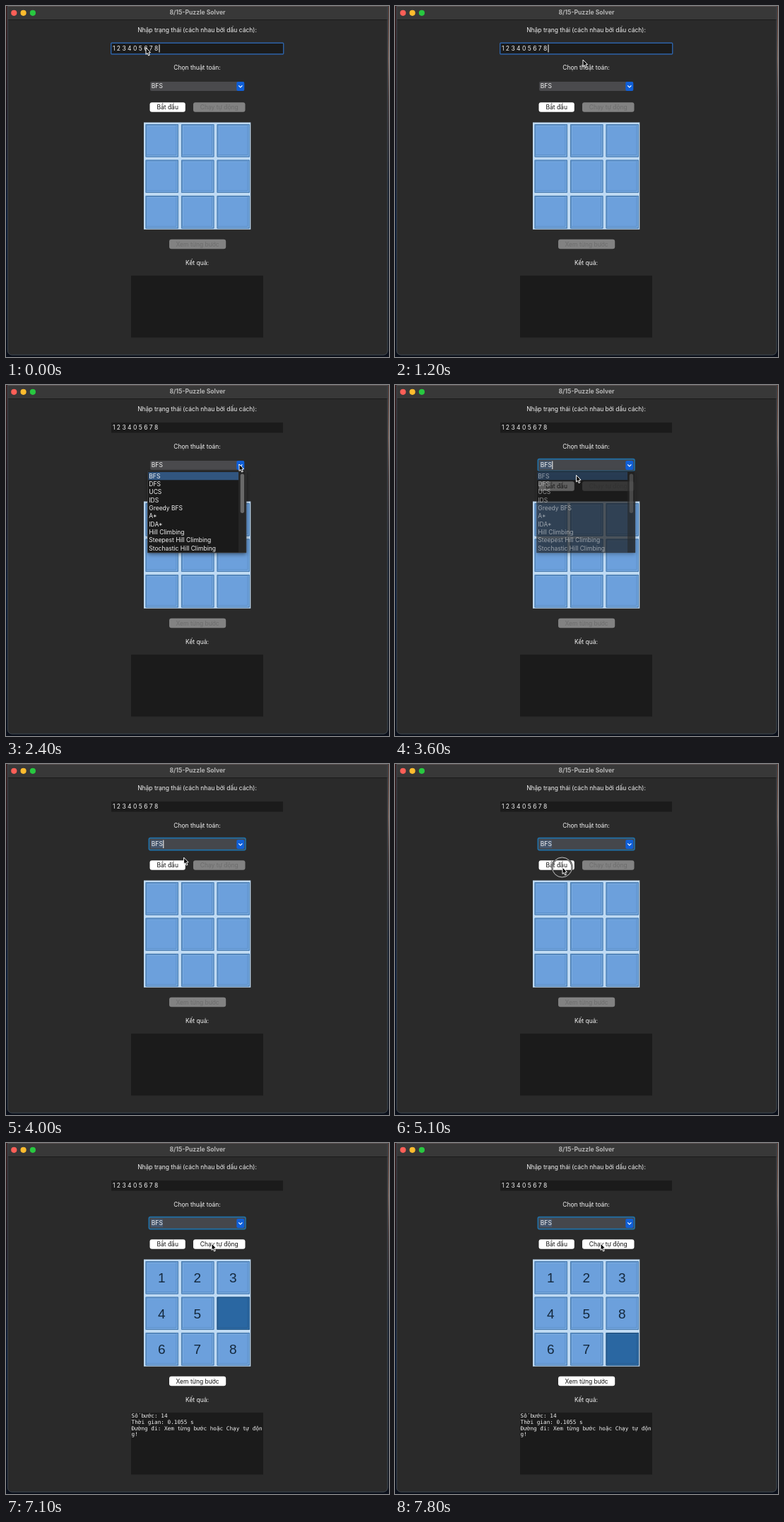
An HTML page with a canvas for the animation above (8000 ms loop, 542 px wide and 496 px high).

```html
<!DOCTYPE html>
<html lang="vi">
<head>
<meta charset="utf-8">
<title>8/15-Puzzle Solver</title>
<style>
  html, body { margin: 0; height: 100%; overflow: hidden; background: #0b1424; }
  canvas { display: block; width: 542px; height: 496px; }
</style>
</head>
<body>
<canvas id="stage" width="542" height="496"></canvas>
<script>
const ctx = document.getElementById('stage').getContext('2d');
const LOOP = 8000, STEP = 100;
const UI = '8.5px Inter, sans-serif';
const MONO = '7.7px "DejaVu Sans Mono", monospace';
const ALGORITHMS = ['BFS', 'DFS', 'UCS', 'IDS', 'Greedy BFS', 'A*', 'IDA*',
  'Hill Climbing', 'Steepest Hill Climbing', 'Stochastic Hill Climbing'];
const RESULT = ['Số bước: 14', 'Thời gian: 0.1055 s',
  'Đường đi: Xem từng bước hoặc Chạy tự độn', 'g!'];

// Moments of the interaction, in ms
const OPEN = 2400, PICK = 3500, CLOSED = 3800, CLICK = 5100, SOLVED = 5300;
const FIRST_MOVE = 7100, SECOND_MOVE = 7600;

// Pointer path: [time, x, y]
const PATH = [
  [0, 198, 59], [300, 156, 57], [400, 156, 57], [900, 220, 58], [1100, 220, 58],
  [1200, 266, 76], [1800, 330, 112], [2700, 330, 112], [3300, 256.5, 127.5],
  [3900, 256.5, 127.5], [4300, 237, 146], [6200, 237, 146], [6300, 260.5, 146],
  [6600, 291, 142], [LOOP, 291, 142]
];

function pointerAt(t) {
  const i = PATH.findIndex(p => p[0] > t);
  const [t0, x0, y0] = PATH[i - 1], [t1, x1, y1] = PATH[i];
  const k = (t - t0) / (t1 - t0);
  return [x0 + (x1 - x0) * k, y0 + (y1 - y0) * k];
}

function rect(x, y, w, h, color, radius = 0) {
  ctx.fillStyle = color;
  ctx.beginPath();
  ctx.roundRect(x, y, w, h, radius);
  ctx.fill();
}

function frame(x, y, w, h, color, width = 1, radius = 0) {
  ctx.strokeStyle = color;
  ctx.lineWidth = width;
  ctx.beginPath();
  ctx.roundRect(x, y, w, h, radius);
  ctx.stroke();
}

function disc(x, y, r, color) {
  ctx.fillStyle = color;
  ctx.beginPath();
  ctx.arc(x, y, r, 0, 2 * Math.PI);
  ctx.fill();
}

function text(str, x, baseline, color = '#f2f2f2', font = UI, align = 'left') {
  ctx.font = font;
  ctx.fillStyle = color;
  ctx.textAlign = align;
  ctx.fillText(str, x, baseline);
}

const label = (str, y) => text(str, 270.5, y + 3, '#f2f2f2', UI, 'center');

function verticalGradient(...stops) {
  const g = ctx.createLinearGradient(0, 0, 0, 496);
  stops.forEach(([at, color]) => g.addColorStop(at, color));
  return g;
}

function drawWindow() {
  rect(0, 0, 271, 496, verticalGradient([0, '#3b2222'], [.3, '#1c1620'], [.6, '#0c1c38'], [1, '#0a0f1a']));
  rect(271, 0, 271, 496, verticalGradient([0, '#5b3a30'], [.15, '#84685c'], [.26, '#4c3b3a'], [.5, '#101a2c'], [1, '#0a0f1a']));
  rect(2, 0, 538.5, 493.5, '#2a2a2a', [0, 0, 6, 6]);
  rect(2, 0, 538.5, 19, '#383838');
  rect(2, 0, 538.5, 1, '#595050');
  rect(2, 19, 538.5, 1, '#1b1b1b');
  frame(2.5, -8, 537.5, 501, '#3d4650', 1, 6);
  ['#ff5f57', '#febc2e', '#28c840'].forEach((c, i) => disc(11.3 + i * 13.3, 9.8, 4.1, c));
  text('8/15-Puzzle Solver', 271, 12, '#b4b4b4', 'bold 8.6px Inter, sans-serif', 'center');
}

function drawEntry(focused) {
  rect(149, 53, 243, 14.5, '#1b1b1b');
  if (focused) frame(148.7, 52.2, 244, 15.8, '#2c62a8', 1.4, 1);
  text('1 2 3 4 0 5 6 7 8', 151, 63);
}

function drawCombo(focused) {
  rect(204, 107, 133, 13, '#4a4a4d', 2);
  if (focused) {
    rect(202.5, 104.5, 136.5, 17, '#45474c', 2);
    frame(202.3, 104.6, 136.7, 17, '#1f70a8', 1.6, 2);
    rect(205, 107.5, 17, 11.5, '#46566c');
  }
  rect(326.3, 107, 11, 13, '#0f5fd8', 2);
  ctx.strokeStyle = '#fff';
  ctx.lineWidth = 1.2;
  ctx.beginPath();
  ctx.moveTo(329.2, 112.3);
  ctx.lineTo(331.8, 115);
  ctx.lineTo(334.4, 112.3);
  ctx.stroke();
  text('BFS', 205.8, 116.4);
}

function drawButton(str, x, y, w, enabled) {
  rect(x, y, w, 13.6, enabled ? '#fff' : '#828282', 3);
  text(str, x + w / 2, y + 9.8, enabled ? '#111' : '#6d6d6d', UI, 'center');
}

function drawBoard(digits) {
  rect(195, 164.5, 151.3, 151.3, '#bfdaf3');
  for (let i = 0; i < 9; i++) {
    const x = 197.5 + i % 3 * 50.5, y = 167 + Math.floor(i / 3) * 50.5;
    const blank = digits[i] === '0';
    rect(x, y, 46.5, 46.5, blank ? '#2a67a2' : '#6ca0dc');
    frame(x + .5, y + .5, 45.5, 45.5, blank ? '#245683' : '#4a7cad');
    frame(x + 2.2, y + 2.2, 42, 42, blank ? '#3c79b2' : '#8fbbe8', .8);
    frame(x + 1.6, y + 1.6, 42, 42, blank ? '#22558a' : '#5187c0', .8);
    if (digits[i] > '0')
      text(digits[i], x + 22.8, y + 30, '#14283c', '19px "Liberation Sans", sans-serif', 'center');
  }
}

function drawPopup(alpha) {
  ctx.save();
  ctx.globalAlpha = alpha;
  ctx.shadowColor = 'rgba(0,0,0,.5)';
  ctx.shadowBlur = 6;
  ctx.shadowOffsetY = 2;
  rect(200.5, 121.5, 139.5, 115.5, '#1a1a1a');
  ctx.shadowColor = 'transparent';
  rect(329, 122, 11, 115, '#262626');
  rect(331.7, 125.5, 5.4, 55.5, '#696969', 2.7);
  rect(201.5, 123, 127.5, 11.2, '#31557f');
  frame(200.5, 121.7, 139.3, 115.2, '#3a3a3a', .8);
  ALGORITHMS.forEach((name, i) => text(name, 202.3, 131.7 + i * 11.32));
  ctx.restore();
}

function drawClickRing(x, y) {
  for (const [color, width] of [['#333', 2.4], ['#bbb', 1]]) {
    ctx.strokeStyle = color;
    ctx.lineWidth = width;
    ctx.beginPath();
    ctx.arc(x, y, 14, 0, 2 * Math.PI);
    ctx.stroke();
  }
}

function drawPointer(x, y) {
  ctx.save();
  ctx.translate(x, y);
  ctx.beginPath();
  [[0, 0], [0, 9.4], [2.1, 7.5], [3.6, 11], [5.3, 10.3], [3.8, 6.9], [6.5, 6.7]]
    .forEach(p => ctx.lineTo(...p));
  ctx.closePath();
  ctx.fillStyle = '#000';
  ctx.fill();
  ctx.strokeStyle = '#fff';
  ctx.lineWidth = 1;
  ctx.lineJoin = 'round';
  ctx.stroke();
  ctx.restore();
}

function boardAt(t) {
  if (t < SOLVED) return '';
  if (t < FIRST_MOVE) return '123405678';
  return t < SECOND_MOVE ? '123450678' : '123458670';
}

function render(t) {
  const solved = t >= SOLVED, comboFocused = t >= PICK;
  drawWindow();
  label('Nhập trạng thái (cách nhau bởi dấu cách):', 34);
  label('Chọn thuật toán:', 87);
  label('Kết quả:', 362.5);
  drawEntry(t < OPEN);
  drawCombo(comboFocused);
  drawButton('Bắt đầu', 203.5, 136.2, 50.3, true);
  drawButton('Chạy tự động', 265, 136.2, 73.5, solved);
  drawButton('Xem từng bước', 231, 329.7, 80.2, solved);
  drawBoard(boardAt(t));
  rect(177, 381, 187, 87.5, '#1b1b1b');
  if (solved) RESULT.forEach((line, i) => text(line, 177.6, 388.3 + i * 8.7, '#f2f2f2', MONO));

  // Carets blink 600 ms on, 300 ms off
  if (t < OPEN && (t < 100 || (t + 600) % 900 < 600)) rect(216.5, 54.5, 1, 11, '#fff');
  if (comboFocused && t % 900 < 600) rect(222.3, 107.5, 1, 11.5, '#fff');

  if (t >= OPEN && t < CLOSED)
    drawPopup(t < PICK ? 1 : Math.max(0, .9 - (t - PICK) / 290));

  const [x, y] = pointerAt(t);
  if (t >= CLICK && t < SOLVED) drawClickRing(x - .5, y);
  drawPointer(x, y);
}

function tick(now) {
  render(Math.floor(now % LOOP / STEP) * STEP);
  requestAnimationFrame(tick);
}
requestAnimationFrame(tick);
</script>
</body>
</html>
```
